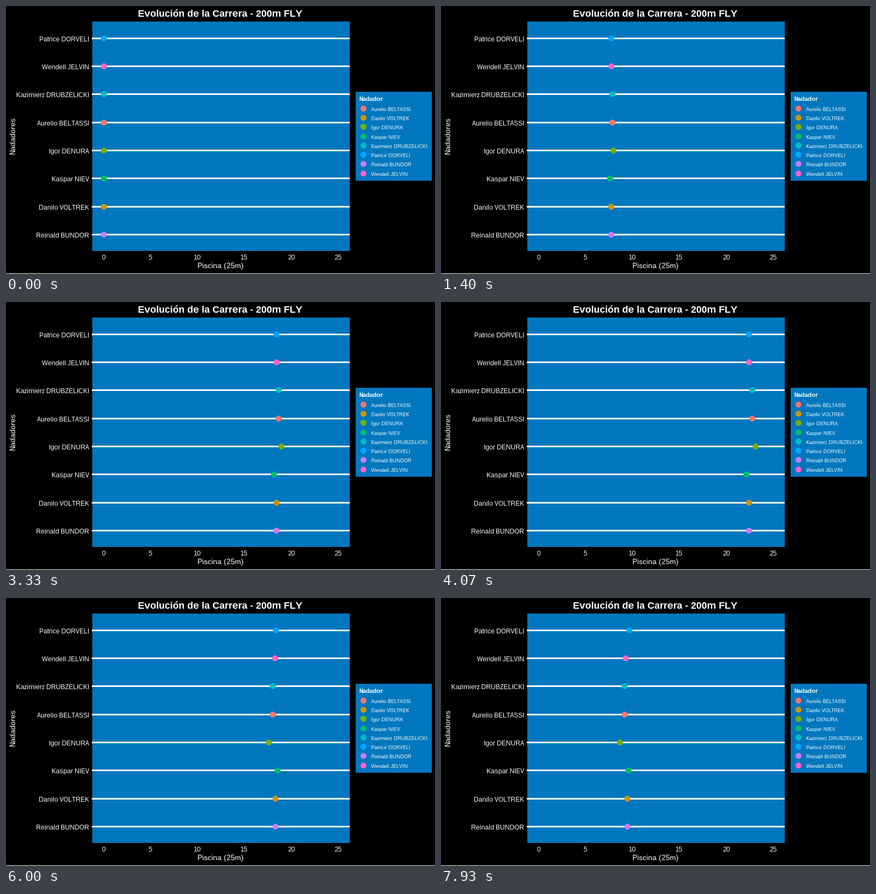
Animation, 800 px wide and 500 px high, one loop 8000 ms. Source, as a matplotlib script:

```python
import matplotlib.pyplot as plt
from matplotlib.animation import FuncAnimation
from matplotlib.patches import Circle, Rectangle

plt.rcParams.update({
    "font.family": "Liberation Sans",
    "text.hinting": "native",
    "text.hinting_factor": 1,
    "text.kerning_factor": 6,
    "toolbar": "None",
})

W, H, DPI = 800, 500, 100
TICK_MS, LOOP_MS = 20, 8000
STEP_MS = LOOP_MS / 120     # the swimmers move in 120 steps per loop
WATER = "#0077BE"
X0, X25 = 182.3, 619.9      # pixel columns of 0 m and 25 m
RADIUS = 5.5

# name, colour, lane from the top, steps for the first and second length
SWIMMERS = [
    ("Aurelio BELTASSI", "#F8766D", 3, 67, 82),
    ("Danilo VOLTREK", "#CD9600", 6, 68, 82),
    ("Igor DENURA", "#7CAE00", 4, 66, 81),
    ("Kaspar NIEV", "#00BE67", 5, 69, 81),
    ("Kazimierz DRUBZELICKI", "#00BFC4", 2, 67, 82),
    ("Patrice DORVELI", "#00A9FF", 0, 68, 83),
    ("Reinald BUNDOR", "#C77CFF", 7, 68, 82),
    ("Wendell JELVIN", "#FF61CC", 1, 68, 81),
]

fig = plt.figure(figsize=(W / DPI, H / DPI), dpi=DPI, facecolor="black")
ax = fig.add_axes([0, 0, 1, 1])
ax.set_xlim(0, W)
ax.set_ylim(H, 0)
ax.axis("off")


def box(x0, y0, x1, y1, color):
    ax.add_patch(Rectangle((x0, y0), x1 - x0, y1 - y0, color=color, lw=0,
                           antialiased=False))


def dot(x, y, color):
    return ax.add_patch(Circle((x, y), RADIUS, facecolor=color, lw=0, zorder=3))


def label(x, y, text, px, ha="left", **kw):
    ax.text(x, y, text, fontsize=px * 72 / DPI, color="white", ha=ha,
            va="baseline", **kw)


def lane_y(lane):
    return int(60.25 + lane * 52.3) + 0.5


def position(step, out, back):
    """Column of a swimmer: one length out, then one length back."""
    if step <= out:
        share = step / out
    else:
        share = 1 - (step - out) / back
    return int(X0 + (X25 - X0) * share) + 0.5


# Pool, titles and horizontal axis
box(0, H - 1, W, H, "white")
box(161, 29, 641, 457, WATER)
label(399, 20, "Evolución de la Carrera - 200m FLY", 18, "center", weight="bold")
label(400, 489, "Piscina (25m)", 14, "center")
ax.text(20, 242, "Nadadores", fontsize=14 * 72 / DPI, color="white", rotation=90,
        ha="right", va="center")
for metres in range(0, 26, 5):
    label(X0 - 0.5 + metres * (X25 - X0) / 25, 473, str(metres), 12, "center")

# Legend
box(652, 160, 794, 326, WATER)
label(658, 177, "Nadador", 11, weight="bold")

dots = []
for i, (name, color, lane, out, back) in enumerate(SWIMMERS):
    y = lane_y(lane)
    box(160, y - 1.5, 641, y + 1.5, "white")
    label(155, y + 5.5, name, 12, "right")
    dots.append(dot(position(0, out, back), y, color))

    key_y = int(191.2 + i * 17.28)
    dot(666.5, key_y + 0.5, color)
    label(681, key_y + 5, name, 9)


def update(tick):
    # Steps start on whole hundredths of a second, hence the small lead
    step = int((tick * TICK_MS + TICK_MS / 2 + 4) / STEP_MS)
    for mark, (_, _, lane, out, back) in zip(dots, SWIMMERS):
        mark.center = (position(step, out, back), lane_y(lane))
    return dots


anim = FuncAnimation(fig, update, frames=LOOP_MS // TICK_MS, interval=TICK_MS,
                     init_func=lambda: update(0), repeat=True, repeat_delay=0,
                     blit=False)
plt.show()
```
